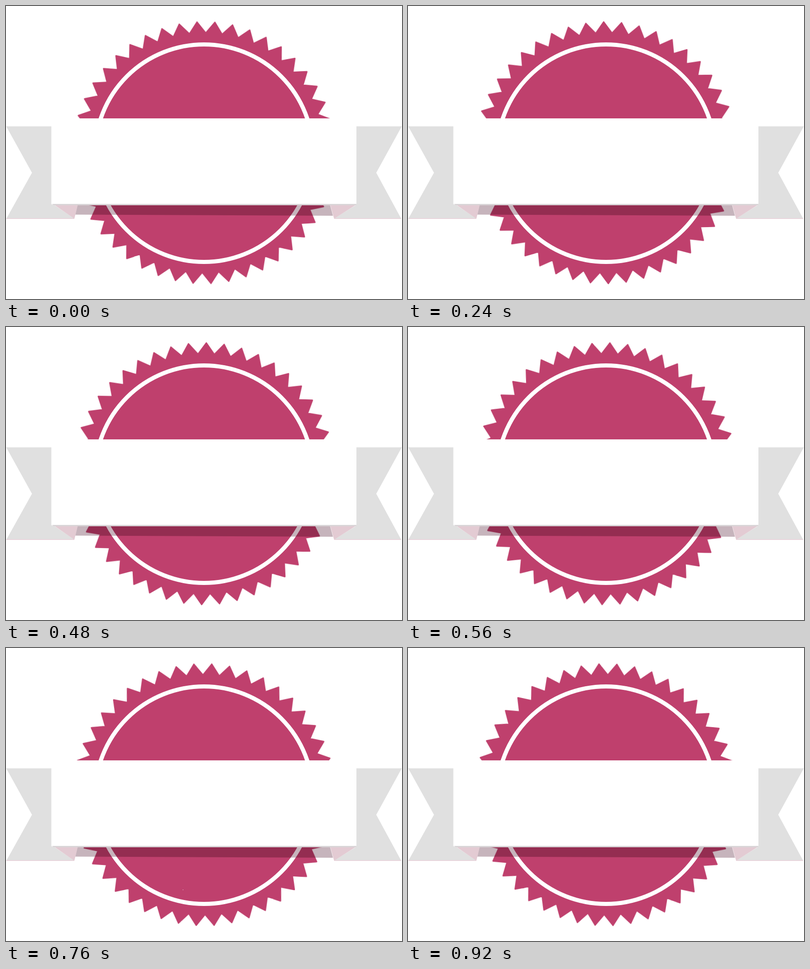
Recreate the animation shown at these times as an HTML page. Size 869 px wide and 644 px high, loop 960 ms.

```html
<!DOCTYPE html>
<html lang="en">
<head>
<meta charset="utf-8">
<title>Turning seal</title>
<style>
  html, body { margin: 0; width: 100%; height: 100%; overflow: hidden; background: #fff; }
  svg { display: block; width: 100%; height: 100%; }
  #seal {
    fill: #bf406d;
    stroke: #bf406d;
    stroke-width: 3;
    stroke-linejoin: round;
    transform-origin: 434.5px 322.5px;
    animation: turn 960ms -1ms infinite;
  }
  /* One tooth pitch (360 / 46 deg) in 23 steps, then a short hold */
  @keyframes turn {
    0% { transform: rotate(-3.0624deg); animation-timing-function: steps(23, end); }
    95.8333%, 100% { transform: rotate(4.7637deg); }
  }
  .ring { fill: none; stroke: #fff; stroke-width: 9; }
  .shadow { fill: #c6b4bc; mix-blend-mode: multiply; }
  .tail { fill: #e0e0e0; }
  .fold { fill: #e3cbd3; }
  .hem { stroke: #ead0d9; stroke-width: 1.5; }
</style>
</head>
<body>
<svg viewBox="0 0 869 644">
  <rect width="869" height="644" fill="#fff"/>
  <polygon id="seal"/>
  <circle class="ring" cx="434.5" cy="323.5" r="239"/>
  <polygon class="shadow" points="157,437 711,437 717.5,461 152,458.5"/>
  <polygon class="tail" points="0.5,264.5 100,264.5 100,436 106,437.5 150,467 1,467 57,366.5"/>
  <polygon class="tail" points="868.5,264.5 768,264.5 768,437.5 720,467 867,467 812.5,366.5"/>
  <polygon class="fold" points="106,437 157.5,437 150,467.5"/>
  <polygon class="fold" points="768,437 711.5,437 720,467.5"/>
  <path class="hem" d="M1 467.3H150M720 467.3H867"/>
  <polygon fill="#d9d5d7" points="99.5,434 769,434 768,438 105,438"/>
  <rect x="99.5" y="247" width="669.5" height="188" fill="#fff"/>
</svg>
<script>
  const teeth = 46, tip = 287.5, valley = 263;
  const points = Array.from({ length: teeth * 2 }, (_, i) => {
    const a = i * Math.PI / teeth, r = i % 2 ? valley : tip;
    return [434.5 + r * Math.sin(a), 322.5 - r * Math.cos(a)].map(v => v.toFixed(2));
  });
  document.getElementById('seal').setAttribute('points', points.join(' '));
</script>
</body>
</html>
```
